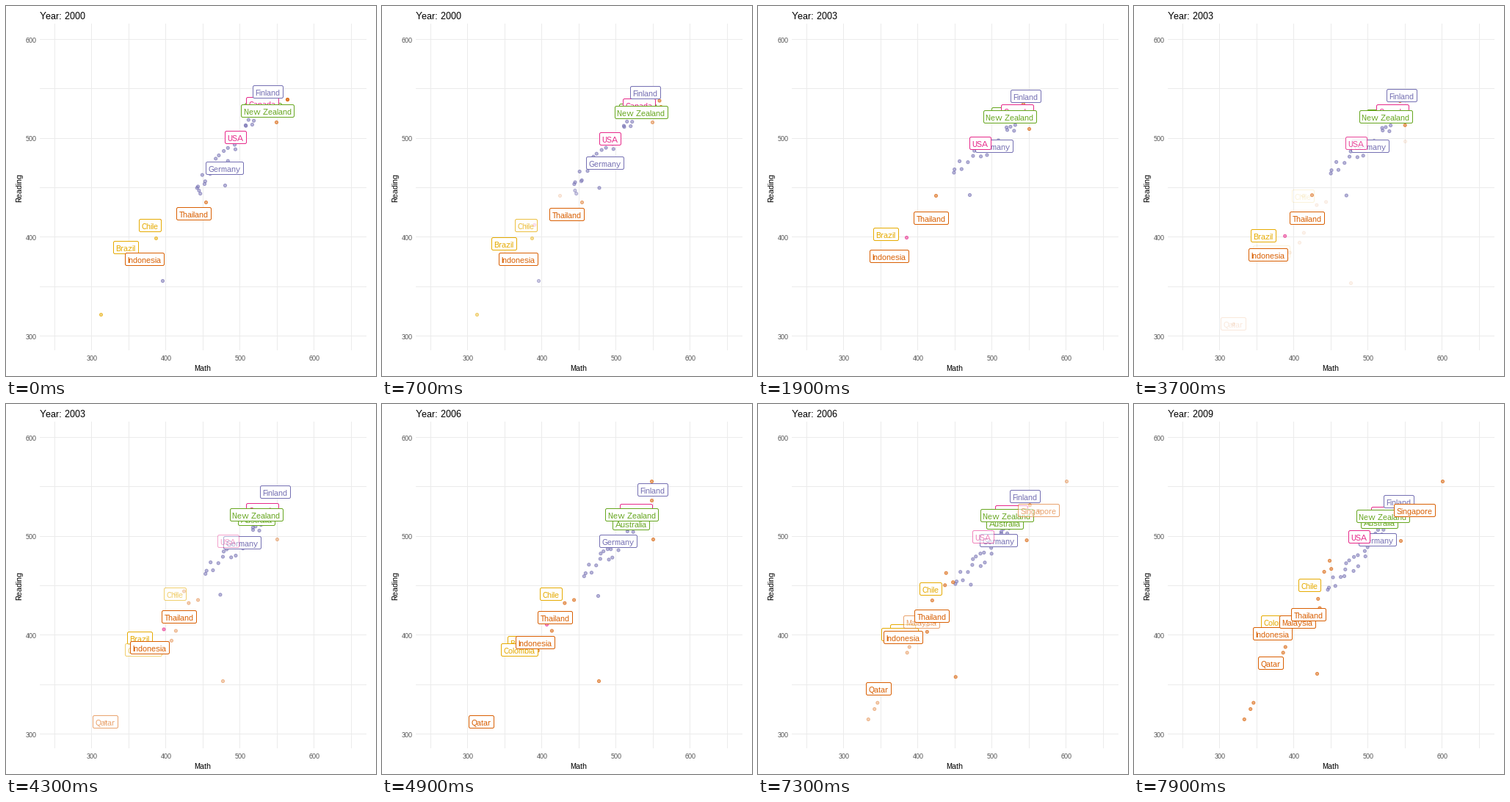
Recreate the animation shown at these times as a matplotlib script. Size 504 by 504 pixels, loop 8000 ms.

```python
import numpy as np
import matplotlib.pyplot as plt
from matplotlib.animation import FuncAnimation
from matplotlib.colors import to_rgb
from matplotlib.patches import FancyBboxPatch

plt.rcParams.update({
    "font.family": "Liberation Sans",
    "text.hinting": "no_autohint",
    "text.hinting_factor": 1,
})

SIZE = 504
STEP = 100                      # ms per frame
FRAMES = 80
MOVES = ((500, 8), (3700, 7), (6700, 7))    # start in ms, number of 200 ms steps
BOX_H = 17

COLOURS = {
    "Asia": to_rgb("#D95F02"),
    "Europe": to_rgb("#7570B3"),
    "North": to_rgb("#E7298A"),
    "Oceania": to_rgb("#66A61E"),
    "South": to_rgb("#E6AB02"),
}

# name, region, first survey, then one box centre per survey
LABELS = [
    ("Australia", "Oceania", 0, (350, 140), (343, 147), (339, 163), (334, 161)),
    ("Brazil", "South", 0, (163, 328), (174, 310), (188, 324), (203, 297)),
    ("Canada", "North", 0, (349, 132), (353, 142), (346, 144), (345, 149)),
    ("Chile", "South", 0, (196, 299)),
    ("Chile", "South", 2, (230, 258), (239, 247)),
    ("Colombia", "South", 2, (187, 335), (198, 297)),
    ("Finland", "Europe", 0, (356, 116), (364, 122), (369, 117), (360, 132)),
    ("Germany", "Europe", 0, (297, 221), (322, 191), (322, 187), (332, 184)),
    ("Indonesia", "Asia", 0, (188, 345), (178, 341), (209, 324), (189, 313)),
    ("Malaysia", "Asia", 3, (222, 297)),
    ("New Zealand", "Oceania", 0, (356, 142), (343, 151), (340, 151), (339, 152)),
    ("Qatar", "Asia", 2, (135, 433), (186, 353)),
    ("Singapore", "Asia", 3, (382, 145)),
    ("Thailand", "Asia", 0, (256, 282), (236, 288), (235, 291), (237, 286)),
    ("USA", "North", 0, (313, 179), (303, 187)),
    ("USA", "North", 3, (306, 180)),
]

# region, first survey, dot count, scatter, then the band's two ends per survey
SWARMS = [
    ("Europe", 0, 20, 7, ((338, 155), (262, 246)), ((352, 166), (268, 222)),
     ((344, 170), (278, 230)), ((340, 172), (266, 250))),
    ("Europe", 0, 3, 4, ((272, 235), (254, 268))),
    ("Asia", 2, 6, 5, ((262, 262), (202, 345)), ((266, 220), (236, 300))),
    ("Asia", 3, 6, 5, ((240, 275), (195, 342))),
    ("Asia", 3, 3, 2, ((167, 401), (148, 430))),
]

# single dots that stand clear of the crowd
LONERS = [
    ("Asia", 0, (383, 127), (369, 167), (367, 131), (372, 142)),
    ("Asia", 0, (383, 127), (361, 133), (367, 105), (360, 130)),
    ("Asia", 0, (368, 158)),
    ("Asia", 0, (272, 267)),
    ("South", 0, (204, 316)),
    ("South", 0, (129, 420)),
    ("Europe", 0, (213, 374)),
    ("Europe", 0, (298, 244), (288, 257), (294, 261), (286, 234)),
    ("North", 0, (209, 292), (202, 315), (224, 300), (238, 286)),
    ("Asia", 1, (242, 258), (242, 252), (266, 213)),
    ("Asia", 2, (369, 184), (363, 186)),
    ("Asia", 2, (295, 377), (249, 367)),
    ("Asia", 3, (420, 105)),
]


def swarm_tracks(rng):
    """Spread each swarm evenly along its band, with a little scatter."""
    for region, first, count, spread, *bands in SWARMS:
        along = (np.arange(count) + rng.random(count))[:, None] / count
        scatter = rng.normal(0, spread, (count, 2)).clip(-2 * spread, 2 * spread)
        years = [np.array(a) + along * np.subtract(b, a) + scatter for a, b in bands]
        for path in zip(*years):
            yield region, first, path


def blend(path, s):
    """Linear position at fractional index s, held at both ends."""
    xy = np.transpose(path)
    return [np.interp(s, range(len(path)), v) for v in xy]


def opacity(first, count, s):
    """Fade in before the first survey and out after the last one."""
    outside = max(first - s, s - (first + count - 1), 0)
    return max(0.0, 1 - outside)


def clock(n):
    """Fractional survey index and the year shown in the title."""
    state, year = 0.0, 2000
    for start, steps in MOVES:
        k = min(max((n * STEP - start) // 200 + 1, 0), steps)
        state += k / steps
        year += 3 * (k >= 5)
    return state, year


fig = plt.figure(figsize=(7, 7), dpi=72, facecolor="white")
ax = fig.add_axes((0, 0, 1, 1))
ax.set_xlim(-0.5, SIZE - 0.5)       # whole numbers are pixel centres
ax.set_ylim(SIZE - 0.5, -0.5)
ax.axis("off")

# panel grid and axis text
grid = dict(color="#EBEBEB", linewidth=1, snap=False, zorder=0)
for i in range(9):
    x = int(66 + 50.5 * i)
    ax.plot((x, x), (24, 468), **grid)
for i in range(7):
    y = int(45.4 + 67.35 * i)
    ax.plot((46, 490), (y, y), **grid)
tick = dict(size=9, color="#4D4D4D")
for i in range(4):
    ax.text(116.5 + 101 * i, 482.5, str(300 + 100 * i), ha="center", **tick)
    ax.text(41, 49 + 134.7 * i, str(600 - 100 * i), ha="right", **tick)
ax.text(267, 496.5, "Math", size=11, ha="center")
ax.text(18, 247, "Reading", size=11, rotation=90, ha="center", va="center")
title = ax.text(46, 17, "", size=13)

# every labelled country also has a dot below its box
tracks = list(swarm_tracks(np.random.default_rng(4)))
tracks += [(region, first, path) for region, first, *path in LONERS]
tracks += [(region, first, path) for _, region, first, *path in LABELS]
dots = ax.scatter(*np.zeros((2, len(tracks))), s=17, linewidths=1,
                  snap=False, zorder=2)

tags = []
renderer = fig.canvas.get_renderer()
for order, (name, region, first, *path) in enumerate(LABELS):
    colour = COLOURS[region]
    text = ax.text(0, 0, name, size=11, color=colour, zorder=3.5 + order)
    width = round(text.get_window_extent(renderer).width) + 7
    box = FancyBboxPatch((0, 0), width, BOX_H, facecolor="white",
                         edgecolor=colour, linewidth=1, zorder=3 + order,
                         boxstyle="round,pad=0,rounding_size=2")
    ax.add_patch(box)
    tags.append((text, box, width, first, path))


def draw(n):
    state, year = clock(n)
    title.set_text(f"Year: {year}")

    fades = [opacity(first, len(path), state) for _, first, path in tracks]
    dots.set_offsets([blend(path, state - first) for _, first, path in tracks])
    dots.set_facecolor([(*COLOURS[t[0]], 0.5 * f) for t, f in zip(tracks, fades)])
    dots.set_edgecolor([(*COLOURS[t[0]], 0.65 * f) for t, f in zip(tracks, fades)])

    for text, box, width, first, path in tags:
        alpha = opacity(first, len(path), state)
        cx, cy = blend(path, state - first)
        left, top = round(cx - width / 2), round(cy - BOX_H / 2)
        box.set_bounds(left, top, width, BOX_H)
        text.set_position((left + 3, top + 13))
        for part in (text, box):
            part.set_alpha(alpha)
            part.set_visible(alpha > 0)
    return [title, dots]


anim = FuncAnimation(fig, draw, frames=FRAMES, interval=STEP,
                     repeat=True, repeat_delay=0, blit=False)
plt.show()
```
